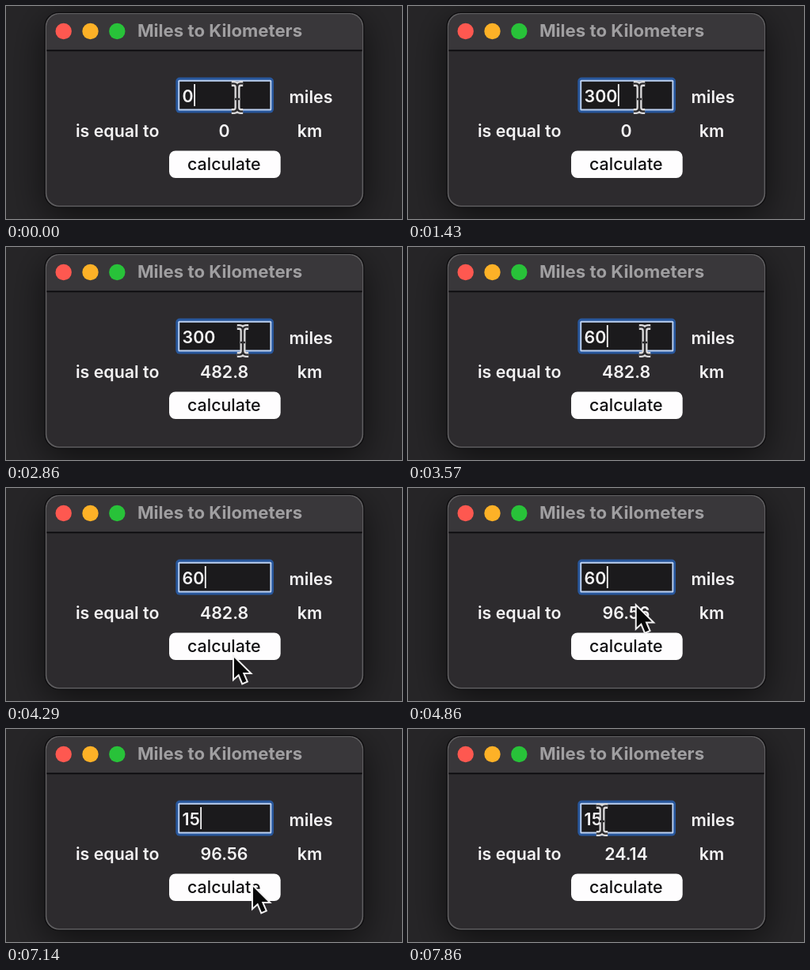
Animation, 500 px wide and 270 px high, one loop 8000 ms. Source, as an HTML page with a canvas:

```html
<!DOCTYPE html>
<html lang="en">
<head>
<meta charset="utf-8">
<title>Miles to Kilometers</title>
<style>
html, body { margin: 0; width: 100%; height: 100%; overflow: hidden; background: #252426; }
canvas { display: block; width: 500px; height: 270px; }
</style>
</head>
<body>
<canvas id="stage"></canvas>
<script>
const LOOP = 8000;
const KM_PER_MILE = 1.609344;
const TRAVEL = 3;       // steps the pointer needs between entry and button
const BLINK = 6.3;      // caret period in steps
const BLINK_ON = 4.2;
const FONT = 'Inter, "Open Sans", sans-serif';

const canvas = document.getElementById('stage');
const ctx = canvas.getContext('2d');
const scale = window.devicePixelRatio || 1;
canvas.width = 500 * scale;
canvas.height = 270 * scale;

// Each round types a distance, presses the button and returns to the entry.
// A step lasts one seventh of a second.
const rounds = [
  { miles: '0', type: 0, press: -6, button: { x: 292, y: 116 }, rest: { x: 292, y: 116 } },
  { miles: '300', type: 4, press: 14, button: { x: 288, y: 213 }, rest: { x: 299, y: 119 } },
  { miles: '60', type: 22, press: 31, button: { x: 286, y: 211 }, rest: { x: 287, y: 124 } },
  { miles: '15', type: 41, press: 51, button: { x: 310, y: 196 }, rest: { x: 245, y: 115 } },
];

function glide(from, to, u) {
  u = Math.min(1, Math.max(0, u));
  const e = u * u * (3 - 2 * u);
  return { x: from.x + (to.x - from.x) * e, y: from.y + (to.y - from.y) * e };
}

function pointerAt(step) {
  const i = rounds.findLastIndex(r => step >= r.press - 1 - TRAVEL);
  const { press, button, rest } = rounds[i];
  if (step > press) return glide(button, rest, (step - press - 1) / TRAVEL);
  return glide(rounds[i - 1].rest, button, (step - press + 1) / TRAVEL + 1);
}

function entryAt(step) {
  const round = rounds.findLast(r => step >= r.type);
  const typedEnd = round.type + round.miles.length - 1;
  const blinkStart = step >= round.press ? Math.max(round.press, typedEnd) : typedEnd;
  return {
    str: round.miles.slice(0, step - round.type + 1),
    selected: rounds.some(r => step === r.type - 1),
    caret: step < typedEnd || (step - blinkStart) % BLINK < BLINK_ON,
  };
}

function resultAt(step) {
  const { miles } = rounds.findLast(r => step > r.press);
  return String(+(miles * KM_PER_MILE).toFixed(2));
}

function box(x, y, w, h, r, fill) {
  ctx.beginPath();
  ctx.roundRect(x, y, w, h, r);
  ctx.fillStyle = fill;
  ctx.fill();
}

function text(str, x, y, { color = '#f4f3f4', weight = 600, size = 21.4, align = 'center' } = {}) {
  ctx.font = `${weight} ${size}px ${FONT}`;
  ctx.textAlign = align;
  ctx.fillStyle = color;
  ctx.fillText(str, x, y);
}

function drawWindow() {
  ctx.fillStyle = '#272628';
  ctx.fillRect(0, 0, 500, 270);

  ctx.save();
  ctx.shadowColor = 'rgba(0,0,0,0.6)';
  ctx.shadowBlur = 48 * scale;
  ctx.shadowOffsetY = 12 * scale;
  box(48.5, 7.8, 404, 247.8, 18, '#0d0c0e');
  ctx.restore();

  box(49.8, 9, 401.4, 245.6, 17, '#5f5e60');
  box(51.4, 10.6, 398.2, 242.4, 16, '#2d2b2e');
  box(51.4, 10.6, 398.2, 45.8, [16, 16, 0, 0], '#39373a');
  ctx.fillStyle = '#0b0a0c';
  ctx.fillRect(51.4, 55.5, 398.2, 1.8);

  ['#fe5850', '#fdb127', '#28c239'].forEach((color, i) => {
    ctx.beginPath();
    ctx.arc(72.7 + 33.8 * i, 32, 10.2, 0, 2 * Math.PI);
    ctx.fillStyle = color;
    ctx.fill();
  });
  text('Miles to Kilometers', 270, 39, { color: '#a09fa1', weight: 700, size: 22.2 });
}

function drawEntry(step) {
  box(214.3, 90.6, 123.7, 45, 5, '#28579c');
  box(217.3, 93.8, 118, 38.6, 1.5, '#bdd2f2');
  box(219.2, 95.7, 114.2, 34.8, 0, '#1b1a1c');

  const { str, selected, caret } = entryAt(step);
  ctx.font = `600 21.4px ${FONT}`;
  const end = 222.6 + ctx.measureText(str).width;
  if (selected) box(221, 98, end + 3 - 221, 31, 0, '#3c618d');
  else if (caret) box(end + 0.5, 99, 1.8, 28, 0, '#f4f3f4');
  text(str, 222.6, 122, { align: 'left' });
}

function drawIBeam() {
  ctx.beginPath();
  for (const side of [-1, 1]) {
    ctx.moveTo(-7.2, 17.6 * side);
    ctx.lineTo(-4, 17.6 * side);
    ctx.quadraticCurveTo(0, 17.2 * side, 0, 12.5 * side);
    ctx.quadraticCurveTo(0, 17.2 * side, 4, 17.6 * side);
    ctx.lineTo(7.2, 17.6 * side);
  }
  ctx.moveTo(0, -13);
  ctx.lineTo(0, 13);
  ctx.moveTo(-3, 2);
  ctx.lineTo(3, 2);
  ctx.lineJoin = 'round';
  ctx.strokeStyle = '#dcdbdc';
  ctx.lineWidth = 7;
  ctx.stroke();
  ctx.strokeStyle = '#2c2b2d';
  ctx.lineWidth = 2.4;
  ctx.stroke();
}

function drawArrow() {
  ctx.beginPath();
  [[2, 4], [2, 30], [8, 24.5], [12.8, 36], [17.5, 34], [12.8, 23], [21, 23]]
    .forEach(([x, y]) => ctx.lineTo(x, y));
  ctx.closePath();
  ctx.lineJoin = 'miter';
  ctx.strokeStyle = '#f1f0f1';
  ctx.lineWidth = 4;
  ctx.stroke();
  ctx.fillStyle = '#080809';
  ctx.fill();
}

function drawPointer(step) {
  const { x, y } = pointerAt(step);
  const overEntry = x > 214 && x < 338 && y > 91 && y < 135;
  ctx.save();
  ctx.translate(x, y);
  if (overEntry) drawIBeam();
  else drawArrow();
  ctx.restore();
}

function draw(step) {
  ctx.setTransform(scale, 0, 0, scale, 0, 0);
  drawWindow();
  drawEntry(step);
  text('miles', 385, 123);
  text('is equal to', 140.7, 165.5);
  text(resultAt(step), 275.5, 165.5);
  text('km', 383.5, 165.5);

  const down = rounds.some(r => step === r.press);
  box(206, 183.5, 140.7, 34.5, 8, down ? '#2f6fd8' : '#fefdfe');
  text('calculate', 275.3, 208, { color: down ? '#ffffff' : '#111012', weight: 500 });
  drawPointer(step);
}

function tick() {
  // Steps begin on whole hundredths of a second.
  const hundredths = Math.floor((performance.now() % LOOP) / 10);
  draw(Math.ceil(7 * (hundredths + 0.5) / 100) - 1);
  requestAnimationFrame(tick);
}
tick();
</script>
</body>
</html>
```
